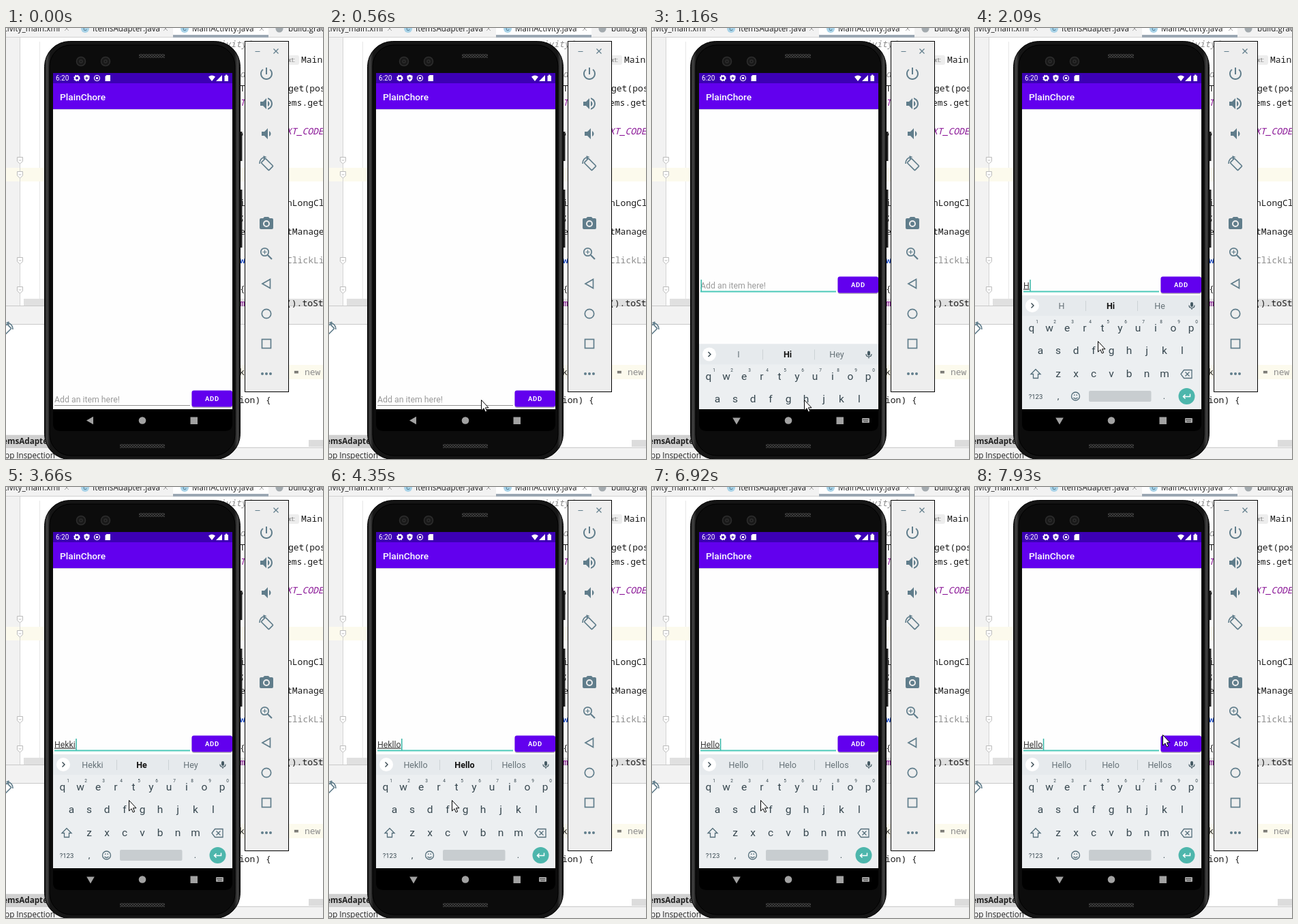
Write an HTML page that moves like this. It is 465 px wide and 632 px high and loops after 7990 ms.

```html
<!DOCTYPE html>
<html lang="en">
<meta charset="utf-8">
<title>To-do app in a phone emulator</title>
<style>
html, body { margin: 0; width: 100%; height: 100%; overflow: hidden; background: #fff }
svg { display: block; font-family: Roboto, sans-serif }
text { white-space: pre }
.ui { font: 11.7px "Open Sans", sans-serif; fill: #222 }
.code { font: 13px "Noto Sans Mono", monospace; fill: #1a1a1a }
.mid { text-anchor: middle }
.line { fill: none; stroke: #607d8b; stroke-width: 1.7 }
.tool { fill: #607d8b }
</style>
<svg width="465" height="632" viewBox="0 0 465 632">
  <defs>
    <linearGradient id="rim">
      <stop stop-color="#0a0a0a"/><stop offset=".012" stop-color="#444"/><stop offset=".03" stop-color="#151515"/>
      <stop offset=".97" stop-color="#151515"/><stop offset=".988" stop-color="#444"/><stop offset="1" stop-color="#0a0a0a"/>
    </linearGradient>
    <pattern id="mesh" width="4" height="4" patternUnits="userSpaceOnUse">
      <path d="M0 0L4 4M4 0L0 4" stroke="#3c3c3c"/>
    </pattern>
    <clipPath id="screen"><path d="M69 66H332V580Q332 591 321 591H80Q69 591 69 580Z"/></clipPath>
    <clipPath id="kbArea"><rect x="69" y="392" width="263" height="167"/></clipPath>
  </defs>

  <!-- code editor -->
  <rect width="465" height="14" fill="#f2f2f2"/>
  <rect x="245" width="140" height="10" fill="#fff"/>
  <path d="M0 13.5H465" stroke="#d1d1d1"/>
  <rect x="245" y="10" width="140" height="4" fill="#9ba7b3"/>
  <g class="ui">
    <text x="-8" y="5">ctivity_main.xml</text><text x="127" y="5">ItemsAdapter.java</text>
    <text x="273" y="5">MainActivity.java</text><text x="414" y="5">build.gradle</text>
  </g>
  <g fill="#a9d3e8"><circle cx="116" cy="1" r="6"/><circle cx="262" cy="1" r="6"/></g>
  <g class="mid" font-size="8.5" fill="#3e6c84"><text x="116" y="4">C</text><text x="262" y="4">C</text></g>
  <circle cx="401" cy="1" r="5.5" fill="#a3aaae"/>
  <path d="M86-2l6 6m0-6l-6 6M231-2l6 6m0-6l-6 6M372-2l6 6m0-6l-6 6" stroke="#a5a5a5"/>
  <rect y="14" width="20" height="393" fill="#f2f2f2"/>
  <rect y="205" width="465" height="20" fill="#fcfaed"/>
  <path d="M20.5 14V407" stroke="#d4d4d4"/>
  <path d="M49.5 20V205M49.5 225V397" stroke="#e7e7e7"/>
  <g id="folds" fill="#fff" stroke="#bbb"></g>
  <text class="code" x="-6" y="381" fill="#e07030" style="fill:#e58a45">;</text>
  <path d="M26 397H465V407H26Z" fill="#e0e0e0"/>
  <rect y="407" width="465" height="28" fill="#f2f2f2"/>
  <path d="M0 407.5H465M0 434.5H465" stroke="#c9c9c9"/>
  <rect x="340" y="494" width="125" height="21" fill="#fcfaed"/>
  <g id="code" class="code"></g>
  <rect x="414" y="40" width="16" height="14" rx="3" fill="#ededed"/>
  <text x="409" y="50" font-size="9.5" fill="#808080">ext:</text>
  <rect y="596" width="465" height="36" fill="#f2f2f2"/>
  <rect x="340" y="596" width="125" height="18" fill="#fff"/>
  <rect x="444" y="604" width="21" height="10" fill="#dcdcdc"/>
  <rect y="597" width="62" height="18" fill="#d0d0d0"/>
  <path d="M0 615.5H465" stroke="#d0d0d0"/>
  <text class="ui" x="-5" y="610" font-weight="700" style="font-weight:700">emsAdapter</text>
  <text class="ui" x="-2" y="631">pp Inspection</text>

  <!-- phone body -->
  <path d="M343 152h3.5v43H343zM343 237h3.5v85H343z" fill="#222"/>
  <rect x="56.5" y="19.5" width="287" height="613" rx="37" fill="url(#rim)" stroke="#000"/>
  <rect x="64" y="25" width="272" height="602" rx="31" fill="#0c0c0c" stroke="#000"/>
  <path d="M195 38h38v6h-38zM167 610h66v6h-66z" fill="#1b1b1b"/>
  <path d="M195 38h38v6h-38zM167 610h66v6h-66z" fill="url(#mesh)"/>
  <g fill="#191919" stroke="#2d2d2d" stroke-width="1.5">
    <circle cx="110" cy="49" r="6.5"/><circle cx="146" cy="49" r="6.5"/>
    <circle cx="110" cy="49" r="2"/><circle cx="146" cy="49" r="2"/>
  </g>

  <!-- phone screen -->
  <g clip-path="url(#screen)">
    <rect x="69" y="66" width="263" height="494" fill="#fefefe"/>
    <rect x="69" y="118" width="263" height="2" fill="#d8d8d8"/>
    <rect x="69" y="66" width="263" height="16" fill="#3c00b4"/>
    <rect x="69" y="81" width="263" height="38" fill="#6200ee"/>
    <g fill="#fff">
      <text x="73" y="77.3" font-size="10">6:20</text>
      <circle cx="104" cy="73.5" r="3" fill="none" stroke="#fff" stroke-width="2"/>
      <circle cx="104" cy="73.5" r="4.2" fill="none" stroke="#fff" stroke-width="1.2" stroke-dasharray="1.8 1.5"/>
      <path d="M118.500 68.500L122.500 70V73.500Q122 77 118.500 78.500 115 77 114.500 73.500V70Z"/>
      <path d="M116.500 73.500h4M118.500 71.500v4" stroke="#3c00b4"/>
      <circle cx="133.500" cy="73.500" r="4" fill="none" stroke="#fff" stroke-width="1.200"/>
      <circle cx="133.500" cy="73.500" r="1.700"/>
      <path d="M147.500 69H153V78H145.500V71Z"/>
      <path d="M297 71.500Q302 67.500 307 71.500L302 78ZM317 69V78H308ZM320.500 70h1.500v-1.500h2.500V70H326v8h-5.500z"/>
      <text x="79" y="105.500" font-size="13.700" font-weight="500">PlainChore</text>
    </g>

    <g id="form">
      <text id="entry" x="71" y="381.500" font-size="12.300"></text>
      <path id="rule" d="M71 386.500H270"/>
      <rect id="caret" y="369" width="1.500" height="17" fill="#35b5a6"/>
      <rect x="272.500" y="366" width="59.500" height="24" rx="3" fill="#bbb"/>
      <rect x="272.500" y="364.500" width="59.500" height="24" rx="3" fill="#6200ee"/>
      <text class="mid" x="302.500" y="380.300" font-size="9.500" font-weight="700" letter-spacing=".8" fill="#fff">ADD</text>
    </g>

    <g clip-path="url(#kbArea)"><g id="keyboard">
      <rect x="69" y="392" width="263" height="168" fill="#eceff1"/>
      <rect x="69" y="392" width="263" height="30" fill="#e6eaed"/>
      <circle cx="84" cy="407" r="10" fill="#fff"/>
      <path d="M82.500 403.500l3.500 3.500-3.500 3.500" fill="none" stroke="#37474f" stroke-width="1.400"/>
      <path d="M162.500 400V415M238.500 400V415" stroke="#ccd3d6"/>
      <g id="hints" class="mid" font-size="12.500"></g>
      <rect x="316" y="402" width="4" height="7" rx="2" fill="#455a64"/>
      <path d="M314 406.500Q314 410.500 318 410.500T322 406.500M318 410.500V413" fill="none" stroke="#455a64" stroke-width="1.200"/>
      <g id="keys" class="mid" fill="#37474f" font-size="15.500"></g>
      <g fill="none" stroke="#546e7a" stroke-width="1.300">
        <path d="M89 500.500L96 507.500H92.500V513.500H85.500V507.500H82Z"/>
        <path d="M302 507.500L306.500 501.500H318V513.500H306.500ZM308.500 504.500l6 6m0-6l-6 6"/>
        <circle cx="147.500" cy="540" r="6"/><path d="M144.500 542Q147.500 545 150.500 542"/>
      </g>
      <path d="M145 537.500h1.500v1.500H145zM148.500 537.500h1.500v1.500h-1.500z" fill="#546e7a"/>
      <rect x="167" y="532" width="91.500" height="16" rx="2" fill="#c8cdd0"/>
      <circle cx="310.500" cy="540" r="12" fill="#4db6ac"/>
      <path d="M315.500 536.500V540.500H305.500M308.500 537.500l-3 3 3 3" fill="none" stroke="#fff" stroke-width="1.500"/>
    </g></g>

    <rect x="69" y="559" width="263" height="33"/>
    <g fill="#a2a2a2">
      <path id="back" d="M-6 0L4-5.800V5.800Z"/>
      <circle cx="200" cy="575.500" r="5.300"/><rect x="270.500" y="570.500" width="10.500" height="10.500"/>
      <g id="imeIcon"><rect x="308" y="572" width="11" height="7" rx="1"/>
        <path d="M309.500 574.500h8M311 577h5" stroke="#000" stroke-dasharray="1 1"/></g>
    </g>
  </g>

  <!-- emulator tool bar -->
  <rect x="350.500" y="19.500" width="64" height="514" fill="#eee" stroke="#000"/>
  <path d="M365.500 34.500h7M392.500 30.500l7 7m0-7l-7 7" stroke="#607d8b" stroke-width="1.200"/>
  <g class="tool">
    <path transform="translate(370 55)" d="M13 3h-2v10h2V3zm4.830 2.170l-1.420 1.420C17.990 7.860 19 9.810 19 12c0 3.870-3.130 7-7 7s-7-3.130-7-7c0-2.190 1.010-4.140 2.580-5.420L6.170 5.170C4.230 6.820 3 9.260 3 12c0 4.970 4.030 9 9 9s9-4.030 9-9c0-2.740-1.230-5.180-3.170-6.830z"/>
    <path transform="translate(370 99)" d="M3 9v6h4l5 5V4L7 9H3zm13.500 3c0-1.770-1.020-3.290-2.500-4.030v8.050c1.480-.73 2.500-2.250 2.500-4.020zM14 3.230v2.060c2.890.86 5 3.540 5 6.710s-2.110 5.850-5 6.710v2.060c4.010-.91 7-4.490 7-8.770s-2.990-7.860-7-8.770z"/>
    <path transform="translate(370 143)" d="M18.500 12c0-1.770-1.020-3.290-2.500-4.030v8.050c1.480-.73 2.500-2.250 2.500-4.020zM5 9v6h4l5 5V4L9 9H5z"/>
    <path transform="translate(370 275)" d="M9 2L7.170 4H4Q2 4 2 6V18Q2 20 4 20H20Q22 20 22 18V6Q22 4 20 4H16.830L15 2Z"/>
    <circle cx="382" cy="287" r="4" fill="none" stroke="#eee" stroke-width="2"/>
    <circle cx="376" cy="507" r="2"/><circle cx="382" cy="507" r="2"/><circle cx="388" cy="507" r="2"/>
  </g>
  <g class="line">
    <g id="turn"><rect x="-4.500" y="-8" width="9" height="16" rx="1" transform="translate(1 1) rotate(-45)"/>
      <path d="M-10 0Q-10-8-2-10L-4.500-11M-2-10l-2 3"/></g>
    <use href="#turn" transform="translate(382 243) scale(-1 1)"/>
    <circle cx="379.500" cy="328.500" r="5.700"/><path d="M384 333l6 6" stroke-width="2.200"/>
    <path d="M376.500 328.500h6M379.500 325.500v6" stroke-width="1.200"/>
    <path d="M376 375L387.500 368.500V381.500Z"/><circle cx="382" cy="419" r="6.700"/>
    <rect x="375.500" y="456.500" width="13" height="13"/>
  </g>

  <path id="mouse" d="M.5 .5V16L4 12.700 6.300 18 8.700 17 6.400 11.800H11Z" fill="#fff" stroke="#000"/>
</svg>
<script>
const $ = id => document.getElementById(id);
const LOOP = 7990;

// Static parts built from short lists
$('turn').setAttribute('transform', 'translate(382 199)');
$('folds').innerHTML = [194, 215, 341, 384].map(y =>
  `<path d="M16.500 ${y - 4.5}h8v6l-4 3.500-4-3.500zM18.500 ${y}h4"/>`).join('');

// Each row: x, baseline, text, colour, italic
$('code').innerHTML = [
  [306, 28, 'tivityG', '#8c8c8c', 1], [433, 51, 'Main'], [343, 72, 'di', '#8c8c8c', 1],
  [343, 93, 'T        get(pos'.slice(0, 1)], [414, 93, 'get(pos'],
  [343, 114, 'T', '#871094', 1], [411, 114, 'ems.get'],
  [343, 156, ','], [411, 156, 'XT_CODE', '#871094', 1], [343, 261, 'i'], [412, 261, 'nLongCl'],
  [343, 282, ';'], [343, 303, 'e'], [412, 303, 'tManage'], [343, 345, 'w', '#0033b3'],
  [412, 345, 'ClickLi', '#8c8c8c'], [343, 387, '{'], [343, 408, 'm', '#871094'], [411, 408, '().toSt'],
  [342, 509, 'k'], [422, 509, '='], [438, 509, 'new', '#8c8c8c'], [342, 550, 'ion) {'],
].map(([x, y, s, fill = '#1a1a1a', it]) =>
  `<text x="${x}" y="${y}" style="fill:${fill}${it ? ';font-style:italic' : ''}">${s}</text>`).join('');

const label = (x, y, s, size) => `<text x="${x}" y="${y}"${size ? ` font-size="${size}"` : ''}>${s}</text>`;
const row = (s, x, y) => [...s].map((c, i) => label(x + i * 26, y, c)).join('');
$('keys').innerHTML = row('qwertyuiop', 83, 444.5) + row('asdfghjkl', 96, 477.5) + row('zxcvbnm', 122, 511.5) +
  [...'1234567890'].map((c, i) => label(91 + i * 26, 433, c, 6.5)).join('') +
  label(89, 543.5, '?123', 9.5) + label(122, 543.5, ',', 13) + label(277.5, 543.5, '.', 13);

// Typing: time, entry, suggestions (* marks the bold one)
const typing = [
  [0, '', 'I', '*Hi', 'Hey'],
  [2090, 'H', 'H', '*Hi', 'He'],
  [2170, 'He', 'He', '*Hey', 'Hello'],
  [2250, 'Hek', 'Hek', '*He', 'Hey'],
  [2400, 'Hekk', 'Hekk', '*He', 'Hey'],
  [2630, 'Hekki', 'Hekki', '*He', 'Hey'],
  [3730, 'Hekk', 'Hekk', '*He', 'Hey'],
  [3800, 'Hek', 'Hek', '*He', 'Hey'],
  [4030, 'Hekl', 'Hekl', '*Hell', 'Hello'],
  [4200, 'Hekll', 'Hekll', '*Hell', 'Hello'],
  [4350, 'Hekllo', 'Hekllo', '*Hello', 'Hellos'],
  [5530, 'Hekll', 'Hekll', '*Hell', 'Hello'],
  [5680, 'Hekl', 'Hekl', '*Hell', 'Hello'],
  [5850, 'Hek', 'Hek', '*He', 'Hey'],
  [6230, 'He', 'He', 'Hey', 'Hello'],
  [6610, 'Hel', 'Hel', '*Hello', 'Help'],
  [6770, 'Hell', 'Hell', 'Hello', 'Hells'],
  [6920, 'Hello', 'Hello', 'Helo', 'Hellos'],
];
const caretOff = [[0, 860], [1360, 1860], [3180, 3660], [4900, 5360], [7420, 7920]];
// Pointer moves: start, end, from, to
const moves = [
  [80, 560, 366, 640, 223, 545], [1240, 1540, 223, 545, 180, 459],
  [4850, 5130, 180, 459, 159, 459], [7380, 7930, 159, 459, 275, 363],
];

const ramp = (t, a, b) => Math.min(1, Math.max(0, (t - a) / (b - a)));
const ease = p => p * p * (3 - 2 * p);
const show = (id, on) => $(id).setAttribute('visibility', on ? 'visible' : 'hidden');
const move = (id, x, y, rest = '') => $(id).setAttribute('transform', `translate(${x} ${y})${rest}`);

let shown;
function setEntry(state) {
  if (state === shown) return;
  shown = state;
  const [, text, ...hints] = state, entry = $('entry');
  entry.textContent = text || 'Add an item here!';
  entry.setAttribute('fill', text ? '#3a3a3a' : '#9b9b9b');
  entry.setAttribute('text-decoration', text ? 'underline' : 'none');
  $('caret').setAttribute('x', 71.5 + (text ? entry.getComputedTextLength() : 0));
  $('hints').innerHTML = hints.map((s, i) => s[0] === '*'
    ? `<text x="${127 + i * 72}" y="411.500" font-weight="700" fill="#111">${s.slice(1)}</text>`
    : `<text x="${127 + i * 72}" y="411.500" fill="#667278">${s}</text>`).join('');
}

function draw(t) {
  setEntry(typing.findLast(s => s[0] <= t));
  show('caret', !caretOff.some(([a, b]) => t >= a && t < b));

  const focused = t >= 860;
  $('rule').setAttribute('stroke', focused ? '#4cc9b9' : '#919191');
  $('rule').setAttribute('stroke-width', focused ? 2 : 1);
  move('form', 0, t < 940 ? 167 : 0);
  move('keyboard', 0, 168 * (1 - ease(ramp(t, 1040, 1260))));
  move('back', 124, 575.5, ` rotate(${-90 * ramp(t, 900, 1090)})`);
  show('imeIcon', t >= 940);

  const [a, b, x0, y0, x1, y1] = moves.findLast(m => m[0] <= t) || moves[0];
  const p = ease(ramp(t, a, b));
  move('mouse', x0 + (x1 - x0) * p, y0 + (y1 - y0) * p);
  show('mouse', t >= 120);
}

const start = performance.now();
(function tick() {
  draw((performance.now() - start) % LOOP);
  requestAnimationFrame(tick);
})();
</script>
</html>
```
